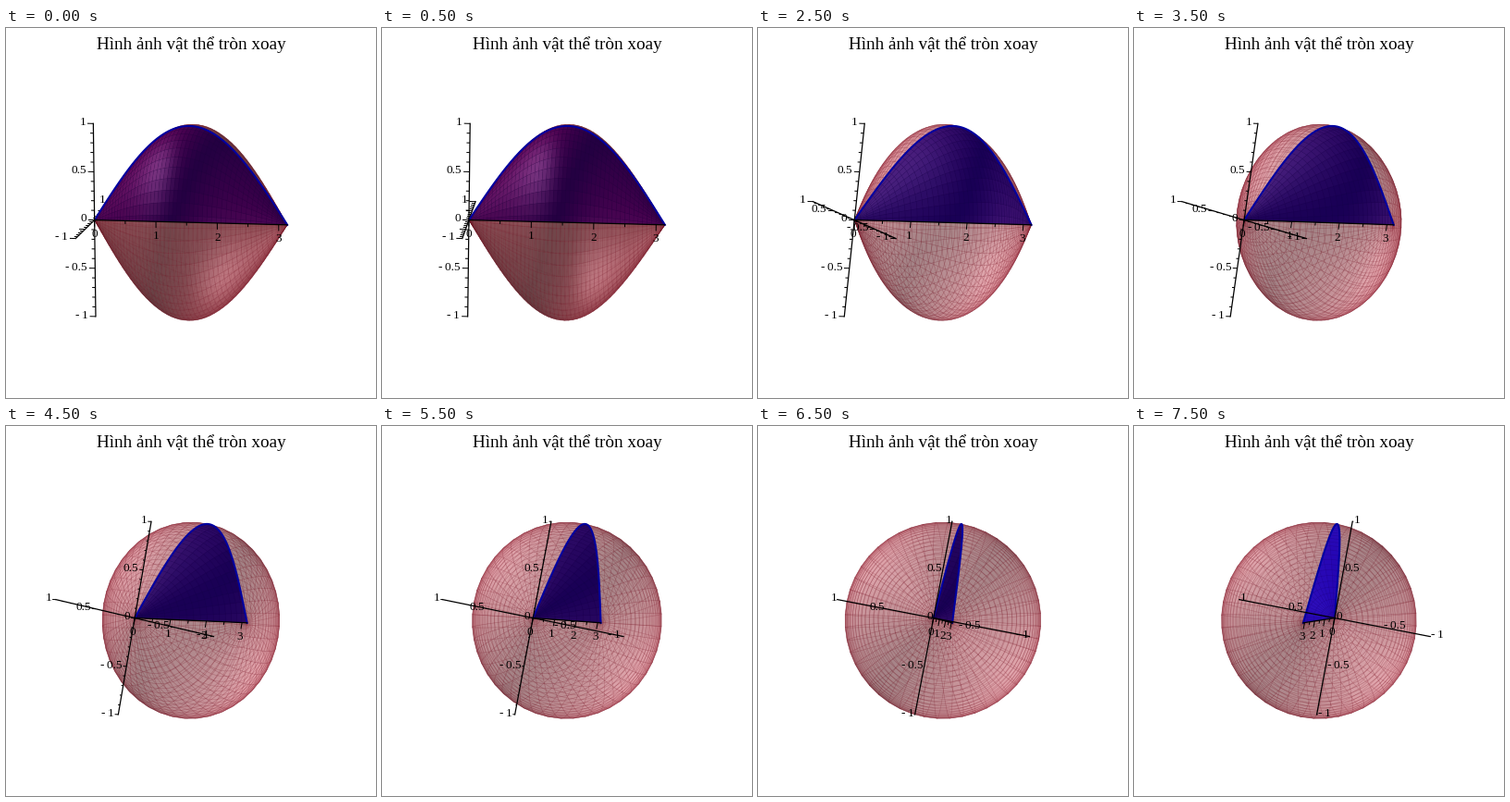
Write a matplotlib script that moves like this. It is 400 by 400 pixels and loops after 8 s.

```python
import numpy as np
import matplotlib.pyplot as plt
from matplotlib.animation import FuncAnimation
from matplotlib.collections import LineCollection, PolyCollection

SIZE, RADIUS = 400, 106.2
CENTER = np.array([199.9, 210.2])
FRAMES, INTERVAL = 16, 500
START, STEP = 11.0, 360 / 49
NX, NT = 48, 48


def unit(v):
    return v / np.linalg.norm(v, axis=-1, keepdims=True)


# The camera circles around this fixed "up" direction.
UP = unit(np.array([-0.0245, 0.188, 0.982]))
E1 = unit(np.array([1.0, 0, 0]) - UP[0] * UP)
E2 = np.cross(UP, E1)
LIGHT = unit(np.array([-0.74, 0.65, -0.15]))
GLOSS = unit(np.array([[-0.58, 0.51, 0.64], [0.58, -0.51, 0.64]]))


def box(x, y, z):
    """Data coordinates to a cube of half-width 1."""
    return np.stack(np.broadcast_arrays(2 * x / np.pi - 1, y, z), axis=-1)


def solid(x, t):
    return box(x, np.sin(x) * np.cos(t), np.sin(x) * np.sin(t))


gx, gt = np.meshgrid(np.linspace(0, np.pi, NX + 1),
                     np.linspace(0, 2 * np.pi, NT + 1), indexing="ij")
grid = solid(gx, gt)
QUADS = np.stack([grid[:-1, :-1], grid[1:, :-1], grid[1:, 1:], grid[:-1, 1:]],
                 axis=2).reshape(-1, 4, 3)
mx = (gx[:-1, :-1] + np.pi / NX / 2).ravel()
mt = (gt[:-1, :-1] + np.pi / NT).ravel()
MIDS = solid(mx, mt)
NORMALS = unit(np.stack([-np.pi / 2 * np.cos(mx), np.cos(mt), np.sin(mt)], axis=-1))
cx = np.linspace(0, np.pi, 100)
CURVE = box(cx, 0, np.sin(cx))

fig = plt.figure(figsize=(4, 4), dpi=100, facecolor="white")
ax = fig.add_axes([0, 0, 1, 1])


def rgb(*c):
    return np.array(c) / 255


def mix(dark, light, s, gloss):
    c = rgb(*dark) + (rgb(*light) - rgb(*dark)) * s[:, None]
    return np.clip(c + gloss[:, None], 0, 1)


def with_alpha(colors, alpha):
    return np.column_stack([colors, np.broadcast_to(alpha, len(colors))])


def label(p, value, ha="center"):
    ax.text(p[0], p[1], f"{value:g}".replace("-", "-\u2009"), ha=ha, va="center",
            size=9.5, family=["Liberation Serif", "DejaVu Serif"],
            color="black", zorder=9)


def draw(k):
    ax.cla()
    ax.set(xlim=(0, SIZE), ylim=(SIZE, 0))
    ax.axis("off")
    ax.text(200.2, 23, "Hình ảnh vật thể tròn xoay", ha="center", va="baseline",
            size=13.75, family="Liberation Serif", color="black")

    angle = np.radians(START - STEP * k)
    right = np.cos(angle) * E1 + np.sin(angle) * E2
    view = np.cross(right, UP)
    cam = np.stack([right, UP, view])
    plane = np.stack([right, -UP], axis=1) * RADIUS

    def project(p):
        return CENTER + p @ plane

    # Seen from the far end the solid looks denser.
    dense = view[0] > 0
    from_back = view[1] > 0

    n = NORMALS @ cam.T
    shade = np.abs(n @ LIGHT)
    facing = n * np.sign(n[:, 2:])
    gloss = np.clip(facing @ GLOSS.T, 0, 1).max(axis=1) ** 14
    rim = (1 - np.abs(n[:, 2])) ** 4
    flat = project(QUADS)
    order = np.argsort(MIDS @ view)

    if dense:
        pink = mix((78, 34, 38), (135, 42, 54), shade, 0.2 * gloss)
        alpha = 0.6 + 0.15 * rim
    else:
        pink = mix((95, 40, 45), (200, 86, 100), shade, 0.1 * gloss)
        alpha = 0.35 + 0.2 * rim
    ax.add_collection(PolyCollection(
        flat[order], facecolors=with_alpha(pink[order], alpha[order]),
        edgecolors=(0.45, 0.05, 0.12, 0.2), linewidths=0.4, zorder=2))

    # Flat region under the curve, tinted by the solid in front of it.
    if dense:
        tones, shine = ((36, 0, 66), (98, 4, 88)), 0.2
    elif from_back:
        tones, shine = ((36, 4, 178), (62, 32, 200)), 0.04
    else:
        tones, shine = ((25, 0, 85), (76, 24, 124)), 0.07
    outline = project(CURVE)
    region, = ax.fill(*outline.T, color=rgb(*tones[0]), lw=0, zorder=4)
    near = (n[:, 2] > 0) & (MIDS[:, 1] * view[1] > 0)
    tint = mix(*tones, shade ** 1.2, shine * gloss)
    cover = PolyCollection(flat[near], facecolors=with_alpha(tint[near], 0.95),
                           edgecolors=(0.08, 0, 0.2, 0.1), linewidths=0.4, zorder=5)
    ax.add_collection(cover)
    cover.set_clip_path(region)
    ax.plot(*outline.T, color=rgb(0, 0, 160), lw=1.5, zorder=6)

    # Axes: ticks of x point along -z, the others along -x.
    out = np.array([-right[0], UP[0]])
    down = np.array([-right[2], UP[2]])
    side = "right" if right[0] > 0 else "left"

    def axis(start, stop, z):
        ax.plot(*project(np.stack([start, stop])).T, color="black", lw=0.9, zorder=z)

    def ticks(points, lengths, direction, z):
        p = project(points)
        ends = p + np.asarray(lengths)[:, None] * direction
        ax.add_collection(LineCollection(np.stack([p, ends], axis=1),
                                         colors="black", linewidths=0.72, zorder=z))

    zero = box(0, 0, 0)
    axis(zero, box(np.pi, 0, 0), 7)
    xs = np.arange(7) / 2
    ticks(box(xs, 0, 0), np.where(np.arange(7) % 2, 3.5, 7), down, 7)
    for i in range(4):
        label(project(box(i, 0, 0)) + 16 * down, i)

    tenths = np.arange(-10, 11)
    vals = tenths / 10
    lens = np.where(tenths % 5, 3.5, 6.5)
    axis(box(0, 0, -1), box(0, 0, 1), 7)
    ticks(box(0, 0, vals), lens, out, 7)
    for sign in (-1, 1):
        z = 7 if sign * view[1] > 0 else 3
        part = vals * sign >= 0
        axis(zero, box(0, sign, 0), z)
        ticks(box(0, vals[part], 0), lens[part], out, z)

    # A strongly foreshortened y axis keeps only its end labels.
    y_labels = (-1, 1) if abs(right[1]) < 0.3 else (-1, -0.5, 0.5, 1)
    shift = 8.5 * out - [0, 1]
    for v in (-1, -0.5, 0, 0.5, 1):
        label(project(box(0, 0, v)) + shift, v, side)
    for v in y_labels:
        label(project(box(0, v, 0)) + shift, v, side)
    return []


anim = FuncAnimation(fig, draw, frames=FRAMES, init_func=lambda: [],
                     interval=INTERVAL, repeat=True, repeat_delay=0, blit=False)
plt.show()
```
